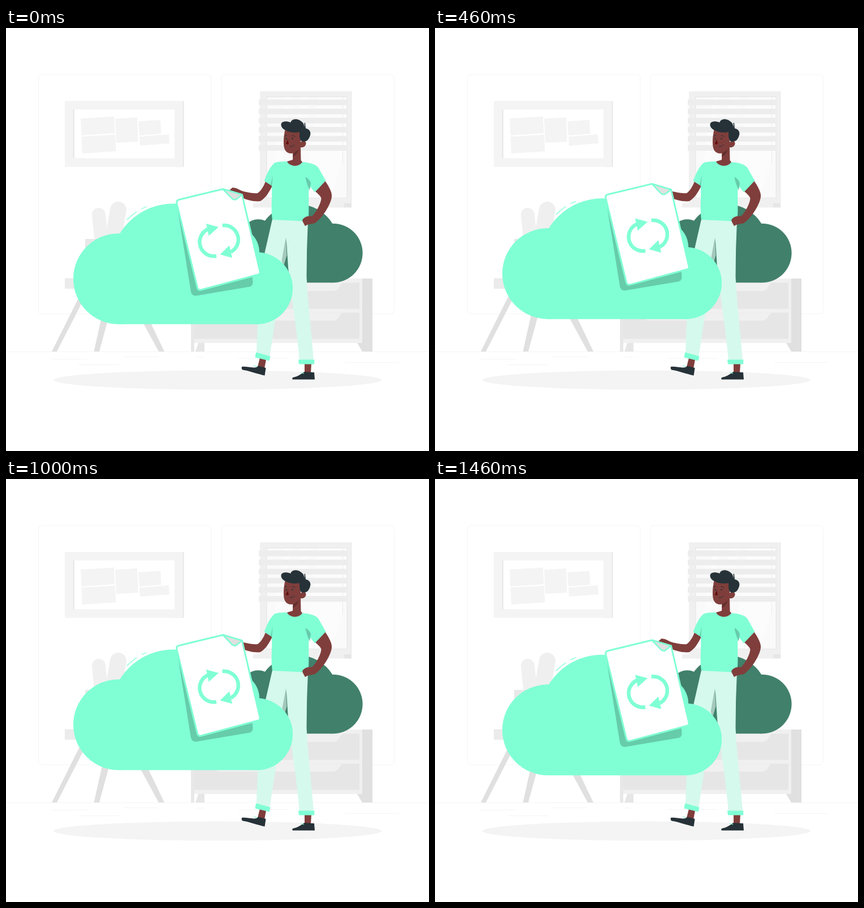
Recreate the animation shown at these times as an HTML page. Size 748x748 px, loop 1.5 s.

```html
<!DOCTYPE html>
<html lang="en">
<head>
<meta charset="utf-8">
<title>Cloud files</title>
<style>
  html, body { margin: 0; width: 100%; height: 100%; overflow: hidden; background: #fff; }
  svg { display: block; width: 100vw; height: 100vh; }
  .mint { fill: #80ffd5; }
  .skin { fill: #7f3e3b; }
  .ink { fill: #263238; }
  .line { fill: none; stroke: #80ffd5; }
</style>
</head>
<body>
<svg viewBox="0 0 748 748">
  <defs>
    <g id="cloud">
      <circle cx="199.300" cy="444" r="80.300"/>
      <path d="M184.900 421.600A110.600 110.600 0 0 1 406.100 421.600V500H184.900Z"/>
      <circle cx="403" cy="397" r="45"/>
      <circle cx="443.500" cy="460.700" r="63.600"/>
      <path d="M199 410H447V524.300H199Z"/>
    </g>
  </defs>

  <g id="room">
    <g fill="none" stroke="#f5f5f5">
      <rect x="57.5" y="82.5" width="305.5" height="423" rx="6"/>
      <rect x="381" y="82.5" width="305.5" height="423" rx="6"/>
      <path d="M0 572.5H748M80 585.5H143M128 595.5H200M208 581.5H270M337 582H350M411 584.5H500M600 591.5H696"/>
    </g>

    <!-- picture -->
    <path fill="#e6e6e6" d="M300 129H314.5V245.5H300Z"/>
    <path fill="#f4f4f4" d="M104 129H312.8V245.5H104Z"/>
    <path fill="#e6e6e6" d="M118.8 144H140V230.5H118.8Z"/>
    <path fill="#fff" d="M120.8 144H298V230.5H120.8Z"/>
    <path fill="#f4f4f4" d="M132 160L191 156.5 192.5 186 133.500 190ZM193 160.500L232 158 233.500 201 195 203ZM234 165L273 162.500 274.500 187 236 190ZM133.500 192L193 188.500 194.500 218 135 222ZM236 192L288 188 289 204 237 208Z"/>

    <!-- window -->
    <path fill="#e6e6e6" d="M449 112H611V317H449Z"/>
    <path fill="#f0f0f0" d="M449 112H610V310H449Z"/>
    <path fill="#e8e8e8" d="M460 121H604V301H460Z"/>
    <path fill="#fafafa" d="M461.500 122.500H602.500V300H461.500Z"/>
    <path fill="#fff" d="M492 122.500H504L478 300H466ZM521 122.500H537L511 300H495ZM552 122.500H602L600 216 574 300H527Z" opacity=".55"/>
    <path fill="#f0f0f0" d="M437 310H599V317.500H437Z"/>
    <path fill="#e6e6e6" d="M598 310H611V317.500H598Z"/>
    <path fill="none" stroke="#ebebeb" d="M595.500 122V240"/>
    <g id="blinds" fill="#ededed"></g>

    <!-- desk -->
    <g fill="#f0f0f0">
      <path d="M164 330L171 400" stroke="#f0f0f0" stroke-width="24" stroke-linecap="round"/>
      <path d="M198.500 321.500L188 382" stroke="#efefef" stroke-width="29" stroke-linecap="round"/>
      <path fill="#e8e8e8" d="M140 373H215V443H140Z"/>
      <path fill="#ebebeb" d="M104 442.500H300V461H104Z"/>
    </g>
    <path fill="#e0e0e0" d="M81 572H90L147 461H136.500ZM155.500 572H165L190 480H176ZM270 572H280L248 505H233.500Z"/>

    <!-- cabinet -->
    <path fill="#f0f0f0" d="M327 443H630V557H327Z"/>
    <path fill="#e0e0e0" d="M630 443H648V572H630L621 557H630Z"/>
    <path fill="#e8e8e8" d="M327 500H333V572H327Z"/>
    <path fill="#e6e6e6" d="M333 450.500H625V496.500H333ZM333 503.500H625V549.500H333ZM335 572H351V557H340Z"/>
    <path fill="#f0f0f0" d="M362 450.500H595Q591 454 588 460 585 465 578 465H380Q373 465 370 460ZM362 503.500H595Q591 507 588 512 584 517.500 577 517.500H379Q372 517.500 369 512Z"/>

    <ellipse cx="374" cy="622.500" rx="290" ry="17" fill="#f4f4f4"/>
  </g>

  <use href="#cloud" fill="#41806b" transform="translate(707.950 109.400) scale(-.65 .65)"/>

  <g id="man">
    <!-- legs and shoes -->
    <path class="skin" d="M449 583L460 586 457 602 445 599ZM528 593H540L539 610H528Z"/>
    <path class="ink" d="M417 599Q416 602 418 604.500C430 606 445 612 457.500 614.500L459.500 601 446 597.500Q443 601 438 600.500C430 600 423 598 417 599ZM507 618C514 617 521 613 527.500 608L545 609 546 621.500H507Q505.500 620 507 618Z"/>
    <path class="line" d="M438 597L444 599M521 609L527 611" stroke-width="1.200"/>
    <path fill="#d5f9ed" d="M471 338L514 340 496 371C493 400 488 430 481 485L466 582 443 577C445 500 450 430 458 395Z"/>
    <path fill="#a4c8bc" d="M495 370L487.500 411 491 421 496.500 402Z"/>
    <path fill="#d5f9ed" d="M480 338L534 341Q531.500 390 531.500 440C534 490 541 545 544 589H519C514 530 504 470 499 424L495.500 370Z"/>
    <path class="mint" d="M442 573.500L467.500 580.500 465.500 588.500 440.500 582.500ZM517 586.500H545.500L545 594.500H518Z"/>

    <!-- arms and shirt -->
    <path class="skin" d="M459 271C456 280 450 289 445 292 436 293 424 290 417 288 411 285 404 281.500 400 282.500L395 287C398 291 405 294 415 299 425 304 440 308 450 306 459 301 466 289 471 279Z"/>
    <path class="skin" d="M564 270C571 280 577 291 576 298 575 311 560 336 546 345 540 346 533 347 529 350L524 341C526 336 534 332 541 333 549 325 557 310 557.500 301 556 296 549 291 545 287Z"/>
    <path class="mint" d="M497 236C503 245 518 246 524 237 535 238 548 240 553 248 557 255 562 264 565.500 270L546 290.500 536 278C534 300 537 322 534 342L471 339C468 320 471 300 470 279L456.500 270.500C461 258 468 243 476 238 483 236 490 236 497 236Z"/>
    <path fill="#66ccaa" d="M472 260L468 277 470 280ZM529.500 263Q537 268 539 274L537 287Q531 274 529.500 263Z"/>
    <path class="skin" d="M524 340C526 335 534 331 541 333L549 331 546 345C540 346 533 347 529 350Z"/>

    <!-- head -->
    <path class="skin" d="M494 178C491 190 490 203 492 212 494 220 501 223 507.500 221.500L507 233 497 236C502 245.500 518 246.500 524 237L521.500 234 521 211C527 212 531 208 530.500 203 529 198 524 199 521 202L520 180Z"/>
    <path fill="#632f2d" d="M507.500 221.500Q514 219 518 214 516 223 507.300 228Z"/>
    <path class="ink" d="M487 174C484 166 493 163 503.500 167 504 160 518 158 526 169Q528 174 528 177.500L527.500 168 529 167.500 530 177.500C537 179 540 184 537.500 191 535 199 530 202 523 200.500 519 198 519 192 519 184 508 186.500 491 183 487 174Z"/>
    <circle class="ink" cx="496" cy="196" r="1.300"/>
    <circle class="ink" cx="506.500" cy="195.800" r="1.300"/>
    <path fill="none" stroke="#263238" d="M492.500 191.500L497 189.500M505.500 190.500Q509 189.500 511.500 192.500M502 209.500Q507 210.500 510.500 206.500"/>
    <path fill="#630f0f" d="M498.500 197.500L494.500 204.500Q497 206.500 500 205Z"/>
  </g>

  <g id="float">
    <use href="#cloud" class="mint"/>
    <path class="line" stroke-width="1.300" stroke-linecap="round" d="M214 339.500Q222 331.500 231 325.500M240 320L248.500 316.500"/>
    <path fill="#66ccaa" d="M303 318L327 467Q329 474.500 336 474L431 458Q437 456 436.500 449L435 435Z"/>
    <path fill="#fff" stroke="#80ffd5" stroke-width="3" stroke-linejoin="round" d="M306 304L383.500 285.300 417.500 295.300 449 431Q450 435.500 446 436.500L345 463.500Q340 465 338.500 460L301.800 310Q301 305 306 304Z"/>
    <path fill="#e0e0e0" stroke="#80ffd5" stroke-width="2.600" stroke-linejoin="round" d="M383.500 285.300L399 301.500Q404 306.500 409 302L417.500 295.300Z"/>
    <g id="recycle">
      <path class="line" stroke-width="6.500" d="M372 403.600A25 25 0 0 1 357 356.300M382.600 349.800A25 25 0 0 1 397.500 396.700"/>
      <path class="mint" d="M354 346.500L376 352.500 358.500 368ZM378.500 401L395 385 400 407Z"/>
    </g>
  </g>
</svg>
<script>
  const LOOP = 1500, STEP = LOOP / 36, RISE = 15, LEAD = 25;
  const float = document.getElementById('float');

  document.getElementById('blinds').innerHTML = Array.from({ length: 6 }, (_, i) =>
    `<rect x="447" y="${126.5 + i * 16.1}" width="157" height="10"/>`).join('');

  // Linear bob, held at 24 pictures a second.
  function lift(ms) {
    const held = Math.floor((ms % LOOP + 4) / STEP) * STEP;
    const phase = (held + LEAD) % LOOP / LOOP;
    return -RISE * (1 - Math.abs(1 - 2 * phase));
  }

  const start = performance.now();
  function draw(now) {
    float.setAttribute('transform', `translate(0 ${lift(Math.max(0, now - start)).toFixed(2)})`);
    requestAnimationFrame(draw);
  }
  draw(start);
</script>
</body>
</html>
```
